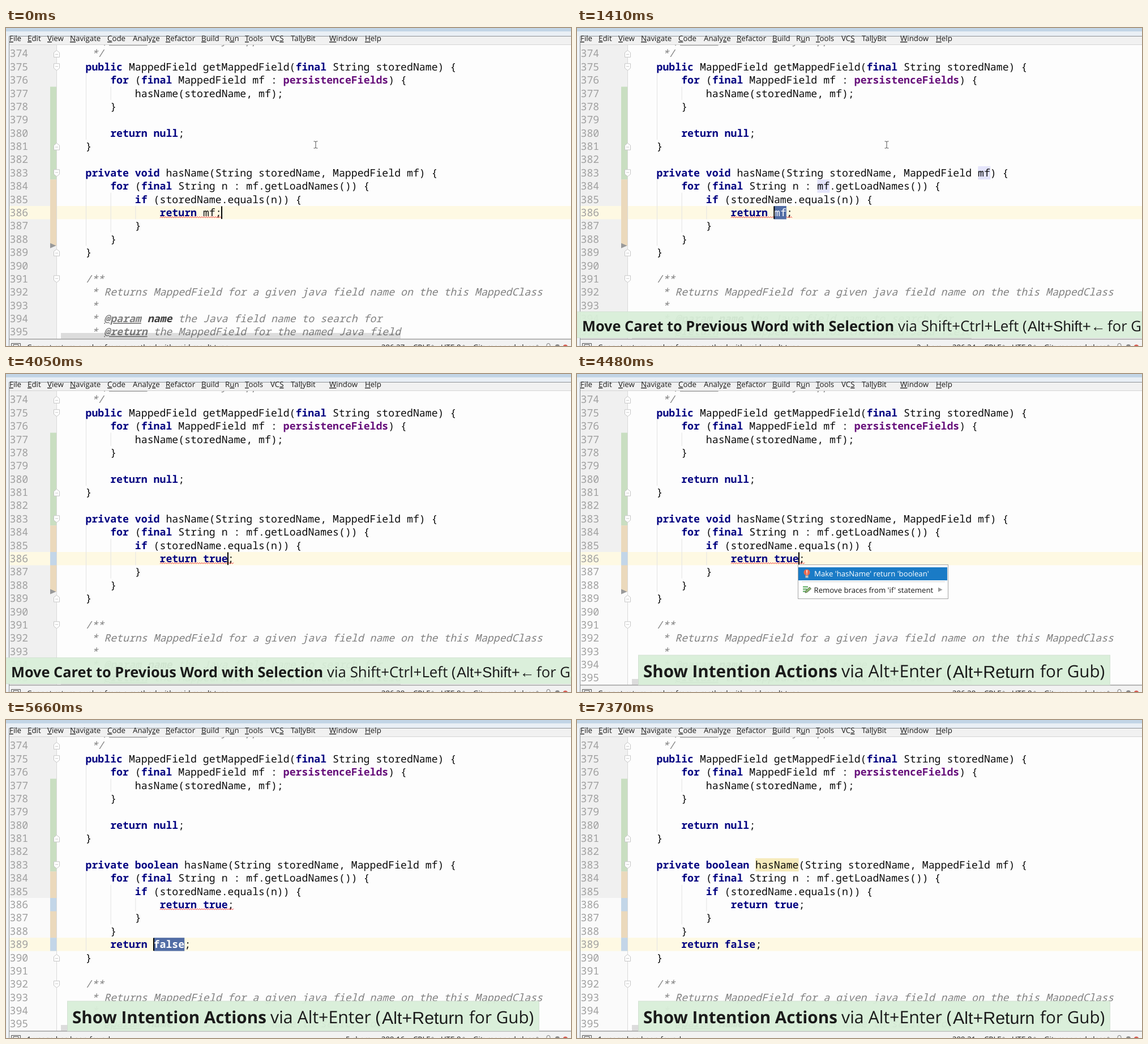
These frames come from a looping animation (998 px wide and 561 px high, 8000 ms). An HTML page:

```html
<!DOCTYPE html>
<html lang="en">
<head>
<meta charset="utf-8">
<title>Editor session</title>
<style>
  html, body { margin: 0; width: 100%; height: 100%; overflow: hidden; background: #fff; }
  svg { display: block; width: 100%; height: 100%; }
  text { text-rendering: geometricPrecision; font-family: "Open Sans", "Noto Sans", sans-serif; fill: #1a1a1a; }
  .code { font: 18.2px "Noto Sans Mono", "DejaVu Sans Mono", monospace; fill: #0c0c0c; }
  .number { fill: #a0a0a0; }
  .keyword { font-weight: 700; fill: #000080; }
  .field { font-weight: 700; fill: #660e7a; }
  .comment { font-style: italic; fill: #808080; }
  .tag { font-weight: 700; text-decoration: underline; }
  .param { font-weight: 700; fill: #3d3d3d; }
  .selected { fill: #fff; }
  .bold { font-weight: 700; }
  .arial { font-family: "Liberation Sans", Arial, sans-serif; }
  .mnemonic { text-decoration: underline; }
</style>
</head>
<body>
<svg id="stage" viewBox="0 0 998 561"></svg>
<script>
const LOOP = 8000, FIRST_LINE = 373;
const CHAR = 10.92, CODE_X = 140.5, ROW = 23.38;
const colX = col => CODE_X + col * CHAR;
const lineY = line => 314 + (line - 386) * ROW;

// Each step changes part of the editor state at the given time.
const steps = [
  [0, { line: 386, col: 22, caret: true, type: 'void', value: 'mf', marks: [], selection: '',
        edited: [], error: true, pointer: true, popup: false, banner: 0, added: false, lowerTint: false }],
  [820, { col: 21 }],
  [1100, { marks: [[383, 52, 2], [384, 26, 2], [386, 19, 2]] }],
  [1250, { col: 19, selection: 'mf' }],
  [1410, { banner: 1 }],
  [2030, { caret: false }],
  [2300, { caret: true, col: 20, value: 't', selection: '', edited: [386], pointer: false,
           marks: [[383, 52, 2], [384, 26, 2]] }],
  [2430, { col: 21, value: 'tr' }],
  [2550, { col: 22, value: 'tru' }],
  [2700, { col: 23, value: 'true' }],
  [2820, { marks: [] }],
  [3370, { caret: false }],
  [4050, { caret: true }],
  [4480, { popup: true, banner: 2, lowerTint: true }],
  [5510, { popup: false, type: 'boolean' }],
  [5660, { added: true, line: 389, col: 11, selection: 'false', edited: [386, 389] }],
  [5940, { error: false }],
  [6080, { marks: [[383, 16, 7, '#f6ebbc']] }],
  [6510, { selection: '', col: 16 }],
  [7370, { caret: false }]
];

const rect = (x, y, w, h, fill, extra = '') =>
  `<rect x="${x}" y="${y}" width="${w}" height="${h}" fill="${fill}" ${extra}/>`;
const path = (d, stroke, fill = 'none', width = 1) =>
  `<path d="${d}" stroke="${stroke}" fill="${fill}" stroke-width="${width}"/>`;
const label = (x, y, size, content, cls = '') =>
  `<text x="${x}" y="${y}" font-size="${size}" class="${cls}">${content}</text>`;
const span = (cls, content) => `<tspan class="${cls}">${content}</tspan>`;

const sourceLines = s => [
  ' * @return the field by mapped name',
  ' */',
  'public MappedField getMappedField(final String storedName) {',
  '    for (final MappedField mf : persistenceFields) {',
  '        hasName(storedName, mf);',
  '    }',
  '',
  '    return null;',
  '}',
  '',
  `private ${s.type} hasName(String storedName, MappedField mf) {`,
  '    for (final String n : mf.getLoadNames()) {',
  '        if (storedName.equals(n)) {',
  `            return ${s.value};`,
  '        }',
  '    }',
  ...(s.added ? ['    return false;'] : []),
  '}',
  '',
  '/**',
  ' * Returns MappedField for a given java field name on the this MappedClass',
  ' *',
  ' * @param name the Java field name to search for',
  ' * @return the MappedField for the named Java field'
].slice(0, 23);

function highlight(line) {
  if (/^\s?[/*]/.test(line)) {
    const doc = line.replace(/@\w+/, tag => span('tag', tag))
      .replace('</tspan> name', '</tspan> ' + span('param', 'name'));
    return span('comment', doc);
  }
  return line
    .replace(/\b(public|private|final|for|if|return|null|void|boolean|true|false)\b/g, word => span('keyword', word))
    .replace('persistenceFields', name => span('field', name));
}

function codeText(line, text) {
  const trimmed = text.trimStart();
  return label(colX(text.length - trimmed.length), lineY(line) + 18, 18.2, highlight(trimmed), 'code');
}

function foldIcon(line, up) {
  const y = lineY(line) + 12, dir = up ? 1 : -1;
  return path(`M84.5 ${y + 6 * dir}h10v${-8 * dir}l-5 ${-4 * dir}l-5 ${4 * dir}zM87 ${y + dir}h5`, '#c6c6c6', '#fff');
}

function guide(col, from, to) {
  return path(`M${colX(col) + 1} ${lineY(from)}V${lineY(to + 1)}`, '#e3e3e3');
}

function squiggle(from, to, y) {
  let d = `M${from} ${y + 1}`;
  for (let x = from + 2, up = true; x <= to; x += 2, up = !up) d += `L${x} ${y + (up ? -1 : 1)}`;
  return path(d, '#f02020', 'none', 0.9);
}

function gutter(s) {
  const end = s.added ? 390 : 389;
  const bar = (from, to, color) => rect(78, lineY(from), 11, (to - from + 1) * ROW, color);
  let out = bar(377, 383, '#c9dec1') + bar(384, 388, '#ebd9bc');
  out += s.edited.map(line => bar(line, line, '#c3d6e8')).join('');
  out += path('M89.5 30V548', '#dadada');
  if (!s.added) out += path('M78 379.5l10.5 4.5l-10.5 4.5z', 'none', '#999');
  for (const line of [374, 381, end]) out += foldIcon(line, true);
  for (const line of [375, 383, end + 2]) out += foldIcon(line, false);
  return out;
}

function editor(s) {
  let out = rect(6, 30, 992, 518, '#fdfdfd') + rect(6, 30, 83, 518, '#f0f0f0');
  if (s.lowerTint) out += rect(6, 314, 83, 234, '#fafafa');
  out += rect(6, lineY(s.line), 992, ROW, '#fef9e3');
  out += guide(0, 376, 380) + guide(4, 377, 377) + guide(0, 384, s.added ? 389 : 388)
    + guide(4, 385, 387) + guide(8, 386, 386);
  out += gutter(s);
  for (const [line, col, length, color = '#e4e4fb'] of s.marks)
    out += rect(colX(col), lineY(line), length * CHAR, ROW, color);
  sourceLines(s).forEach((text, i) => {
    const line = FIRST_LINE + i;
    out += label(6.5, lineY(line) + 18, 18.2, line, 'code number') + codeText(line, text);
  });
  if (s.error) out += squiggle(272, colX(20 + s.value.length), 333.8);
  if (s.selection) {
    out += rect(colX(s.col), lineY(s.line), s.selection.length * CHAR, ROW, '#526da5');
    out += label(colX(s.col), lineY(s.line) + 18, 18.2, s.selection,
      'code selected' + (s.selection === 'false' ? ' bold' : ''));
  }
  if (s.caret) out += rect(colX(s.col) - 0.7, lineY(s.line) + 0.5, 2, ROW - 1, '#000');
  if (s.pointer) out += path('M543.5 200h2.5l1 1l1-1h2.5M547 201v10M543.5 212h2.5l1-1l1 1h2.5', '#555');
  out += rect(97, 538, 600, 10, '#000', 'opacity=".13"');
  return `<clipPath id="view"><rect x="0" y="30" width="998" height="518"/></clipPath><g clip-path="url(#view)">${out}</g>`;
}

const menu = [[6, '_File'], [38, '_Edit'], [73, '_View'], [113, '_Navigate'], [179, '_Code'], [224, 'Analy_ze'],
  [282, '_Refactor'], [345, '_Build'], [387, 'R_un'], [422, '_Tools'], [467, 'VC_S'], [503, 'Tal_lyBit'],
  [571, '_Window'], [634, '_Help']];

function windowFrame() {
  return rect(0, 0, 998, 561, '#fff')
    + rect(0, 0, 998, 6, '#c2d5e6') + rect(0, 6, 998, 8, '#e9eff5') + rect(0, 14, 5, 547, '#eef2f6')
    + rect(5, 14, 993, 16, '#f1f1f1')
    + path('M5.5 561V14.5H998', '#8d9296') + path('M6 29.5H998', '#d5d5d5')
    + menu.map(([x, item]) => label(x, 23, 13.3, item.replace(/_(.)/, span('mnemonic', '$1')))).join('');
}

function statusBar(s) {
  const put = (x, text) => label(x, 568, 13.2, text);
  const arrows = x => path(`M${x} 562l2.5-3l2.5 3`, '#777');
  return rect(6, 549, 992, 12, '#f2f2f2') + path('M5 548.8H998', '#8e8e8e', 'none', 1.3)
    + path('M9.5 561V556.5H25.5V561M13 561V558.5H22V561', '#555')
    + put(37, s.added ? '1 usage has been found' : 'Cannot return a value from a method with void result type')
    + (s.selection ? put(600, s.selection.length + ' chars') : '')
    + put(663, `${s.line}:${s.col + 5}`)
    + put(719, 'CRLF') + arrows(751) + put(768, 'UTF-8') + arrows(806)
    + put(825, 'Git: mapped-class') + arrows(936)
    + path('M955 561v-1.5a3 3 0 0 1 6 0v1.5', '#777')
    + '<circle cx="974" cy="562" r="4" fill="#8a8a8a"/><circle cx="988" cy="563" r="4.5" fill="#d65a50"/>';
}

function popup() {
  return rect(390.5, 336.5, 265, 60, '#fff', 'stroke="#a5a5a5"')
    + rect(391, 341, 263, 23, '#1a7bc6')
    + '<circle cx="406" cy="350" r="5.5" fill="#e8694f"/>'
    + rect(403.5, 355.5, 5, 4, '#c9c3b8') + rect(405.3, 346, 1.5, 5, '#fff') + rect(405.3, 352, 1.5, 1.5, '#fff')
    + label(419, 357, 13.2, "Make 'hasName' return 'boolean'", 'selected')
    + path('M397 366.5H650', '#cfcfcf')
    + path('M399 375.5h9M399 379.5h7M399 383.5h4', '#55a85a', 'none', 1.8)
    + path('M403 386l1-4l7-6l2.5 3l-7 6z', '#5b6b50', '#8bb870')
    + label(418.5, 385.5, 13.2, "Remove braces from 'if' statement")
    + path('M638 376.5l7.5 4l-7.5 4z', 'none', '#9a9a9a');
}

const banners = {
  1: () => rect(0, 500.5, 998, 46, '#d9efd9', 'opacity=".94" stroke="#d3e2d3"')
    + label(9, 535, 25.35, 'Move Caret to Previous Word with Selection', 'bold')
    + label(567, 535, 25.9, 'via Shift+Ctrl+Left (')
    + label(796, 535, 25.8, 'Alt+Shift+←', 'arial')
    + label(937, 535, 25.6, 'for Gub)'),
  2: () => rect(108.5, 496, 833, 52.5, '#d9efd9', 'opacity=".95" stroke="#d0dfd0"')
    + label(117, 535, 29.6, 'Show Intention Actions', 'bold')
    + label(467, 535, 30.3, 'via Alt+Enter (')
    + label(664, 535.5, 30.4, 'Alt+Return', 'arial')
    + label(818, 535, 29.6, 'for Gub)')
};

const stage = document.getElementById('stage');
let shown = -1;

function draw() {
  const time = performance.now() % LOOP;
  const current = steps.filter(([start]) => start <= time).length;
  if (current !== shown) {
    shown = current;
    const state = Object.assign({}, ...steps.slice(0, current).map(([, change]) => change));
    stage.innerHTML = windowFrame() + editor(state) + statusBar(state)
      + (state.popup ? popup() : '') + (state.banner ? banners[state.banner]() : '');
  }
  requestAnimationFrame(draw);
}
draw();
</script>
</body>
</html>
```
